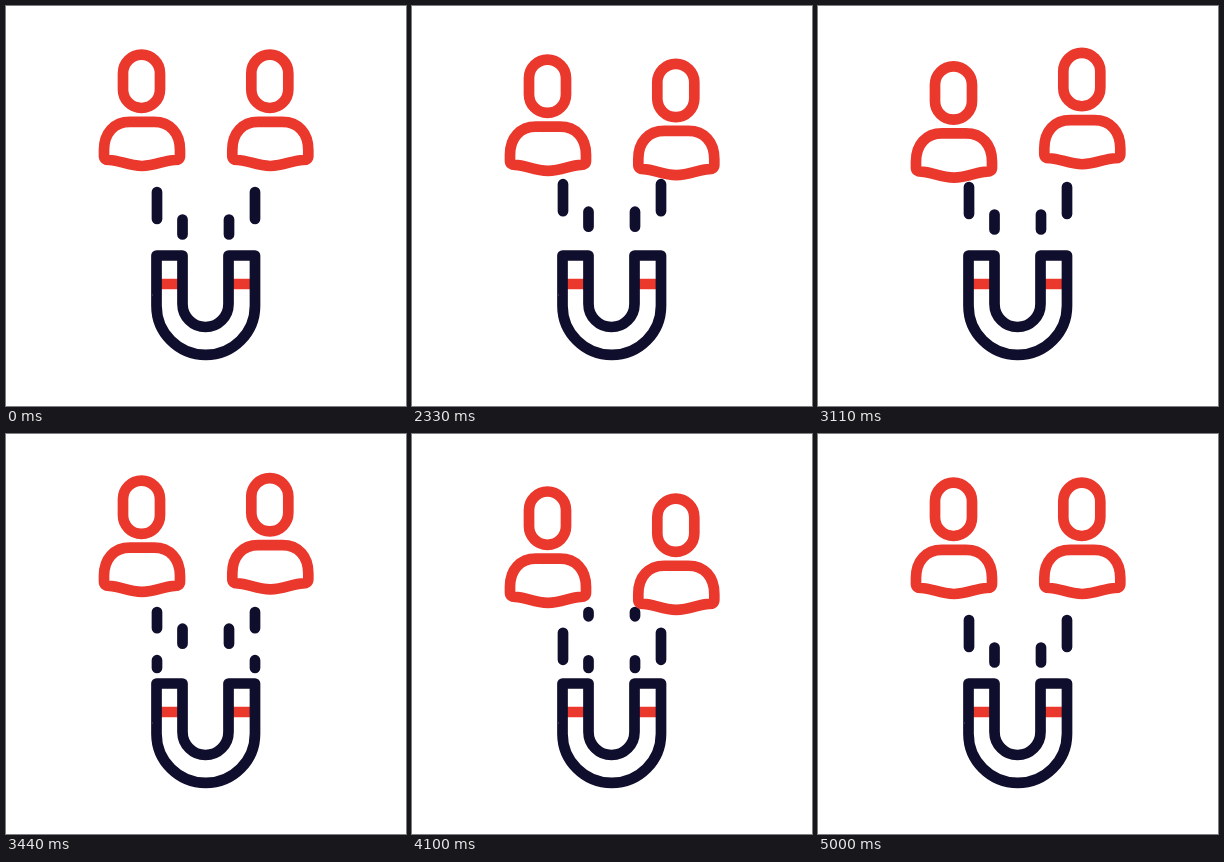
Animation, 400 px wide and 400 px high, one loop 5120 ms. Source, as an HTML page:

```html
<!DOCTYPE html>
<html lang="en">
<head>
<meta charset="utf-8">
<title>Magnet attracting people</title>
<style>
  html, body { margin: 0; width: 100%; height: 100%; overflow: hidden; background: #fff; }
  svg { display: block; width: 100vw; height: 100vh; }
  .ink, .red { fill: none; stroke-width: 10.7; stroke-linejoin: round; }
  .ink { stroke: #100e2d; stroke-linecap: round; }
  .red { stroke: #eb382d; }
</style>
</head>
<body>
<svg viewBox="0 0 400 400">
  <defs>
    <filter id="rough" filterUnits="userSpaceOnUse" x="0" y="0" width="400" height="400"
            color-interpolation-filters="sRGB">
      <feTurbulence id="noise" type="fractalNoise" baseFrequency=".05" numOctaves="1" seed="1"/>
      <feDisplacementMap in="SourceGraphic" scale="1.6" xChannelSelector="R" yChannelSelector="G"/>
    </filter>
    <g id="person" class="red">
      <rect x="117" y="48.7" width="37" height="53.3" rx="18.5"/>
      <path d="M98 144C98 127 108 115.8 124 115.8H148C164 115.8 174 127 174 144V150Q174 154 169 154C158 154 150 160 136 160S114 154 103 154Q98 154 98 150Z"/>
    </g>
  </defs>
  <g filter="url(#rough)">
    <g class="ink">
      <path class="outer" d="M151 178V234M249 178V234" stroke-dasharray="27 32"/>
      <path class="inner" d="M176.5 178V234M223 178V234" stroke-dasharray="15 44"/>
    </g>
    <path class="red" d="M151 278H176M223 278H249"/>
    <path class="ink"
          d="M150.5 249.5H176.5V298a23 23 0 0 0 46 0V249.5H249V299.7a49.25 49.25 0 0 1-98.5 0Z"/>
    <use id="left" href="#person"/>
    <use id="right" href="#person"/>
  </g>
</svg>
<script>
  const LOOP = 5120, START = 2000, STEP = 30, STEPS = 100, PERIOD = 59;
  const $ = s => document.querySelector(s);
  const left = $('#left'), right = $('#right'), noise = $('#noise');
  const outer = $('.outer'), inner = $('.inner');

  const linear = x => x;
  const ease = x => (1 - Math.cos(Math.PI * x)) / 2;

  // Keys are [step, value] pairs.
  function track(keys, n, curve) {
    for (let i = 1; i < keys.length; i++) {
      const [a, from] = keys[i - 1], [b, to] = keys[i];
      if (n <= b) return from + (to - from) * curve((n - a) / (b - a));
    }
    return keys[keys.length - 1][1];
  }

  const leftBob = [[0, 0], [29.5, 16], [55, -6], [79.5, 16], [99.5, 0]];
  const rightBob = [[0, 0], [20, 15.7], [44, -6], [69, 16], [99.5, 0]];
  const flow = [[0, 213], [1, 215.5], [22, 70], [37, -28], [58, -167], [83, -332], [100, -436]];

  // Places the first dash at y; the lines begin at y = 178.
  function setDash(el, y) {
    const offset = ((y - 178) % PERIOD + PERIOD) % PERIOD;
    el.setAttribute('stroke-dashoffset', PERIOD - offset);
  }

  function draw(t) {
    const n = Math.max(0, Math.min(STEPS, Math.floor((t - START) / STEP)));
    left.setAttribute('transform', `translate(0 ${track(leftBob, n, ease)})`);
    right.setAttribute('transform', `translate(128.3 ${track(rightBob, n, ease)})`);
    const y = track(flow, n, linear);
    setDash(outer, y - 27);
    setDash(inner, y + 0.5);
    noise.setAttribute('seed', n < STEPS ? 1 + Math.floor((n + 2) / 3) % 4 : 1);
  }

  const begin = performance.now();
  function tick() {
    draw((performance.now() - begin) % LOOP);
    requestAnimationFrame(tick);
  }
  tick();
</script>
</body>
</html>
```
